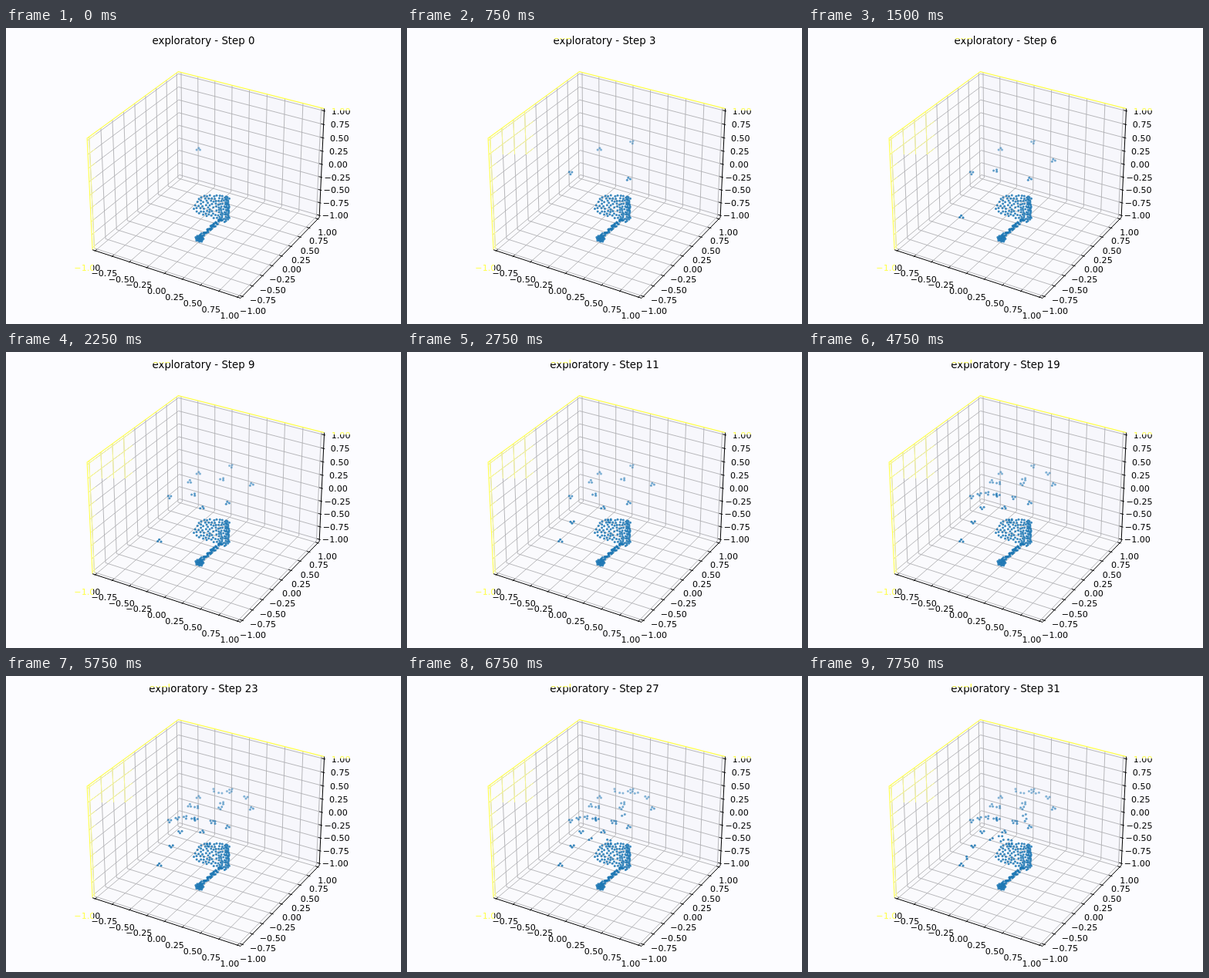
An HTML page with a canvas for the animation above (8000 ms loop, 512 px wide and 384 px high).

```html
<!DOCTYPE html>
<html lang="en">
<head>
<meta charset="utf-8">
<title>exploratory</title>
<style>
  html, body { margin: 0; width: 512px; height: 384px; overflow: hidden; background: #fcfcff; }
  canvas { display: block; }
</style>
</head>
<body>
<canvas id="stage" width="512" height="384"></canvas>
<script>
const STEP_MS = 250, STEPS = 32;
const ctx = document.getElementById('stage').getContext('2d');
const PAPER = '#fcfcff', BLUE = '#1f77b4', YELLOW = '#ffff48', PALE = '#ffff8c', GRID = '#b0b0b4';
const E = 25 / 24, L = E + 0.185;
const TICKS = Array.from({ length: 9 }, (_, i) => i / 4 - 1);

// Perspective view: elevation 30°, azimuth -60°, distance 10.
function project(x, y, z) {
  x *= 4 / 7; y *= 4 / 7; z *= 3 / 7;
  const scale = 1848 / (10 - (0.433 * x - 0.75 * y + 0.5 * z));
  return [
    261.8 + scale * (0.866 * x + 0.5 * y),
    196.5 - scale * (-0.25 * x + 0.433 * y + 0.866 * z)
  ];
}

function trace(points) {
  ctx.beginPath();
  points.forEach(p => ctx.lineTo(...project(...p)));
}

function line(points, color, width = 0.9) {
  trace(points);
  ctx.strokeStyle = color;
  ctx.lineWidth = width;
  ctx.stroke();
}

function pane(points, color) {
  trace(points);
  ctx.fillStyle = color;
  ctx.fill();
}

function inClip(x, y, w, h, draw) {
  ctx.save();
  ctx.beginPath();
  ctx.rect(x, y, w, h);
  ctx.clip();
  draw();
  ctx.restore();
}

function text(str, x, y, size, color = '#000') {
  ctx.font = `${size}px "DejaVu Sans", sans-serif`;
  ctx.textAlign = 'center';
  ctx.fillStyle = color;
  ctx.fillText(str, x, y);
}

// Repaints part of a text in yellow.
function tint(x, y, w, h, draw) {
  inClip(x, y, w, h, () => {
    ctx.fillStyle = PAPER;
    ctx.fillRect(x, y, w, h);
    draw(YELLOW);
  });
}

function drawGrid(color) {
  for (const t of TICKS) {
    line([[t, -E, -E], [t, E, -E], [t, E, E]], color);
    line([[E, t, -E], [-E, t, -E], [-E, t, E]], color);
    line([[-E, -E, t], [-E, E, t], [E, E, t]], color);
  }
}

function label(value, point, dx, dy, color) {
  const [x, y] = project(...point);
  text(value.toFixed(2).replace('-', '\u2212'), x + dx, y + dy + 4, 11.1, color);
}
const xLabel = (t, color) => label(t, [t, -L, -L], 0, 0.5, color);
const yLabel = (t, color) => label(t, [L, t, -L], -4, 0, color);
const zLabel = (t, color) => label(t, [L, L, t], -4.5, 3.5, color);

function drawAxes() {
  const out = E + 0.017, inn = E - 0.034;
  line([[-E, -E, -E], [E, -E, -E], [E, E, -E], [E, E, E]], '#000', 1);
  for (const t of TICKS) {
    line([[t, -out, -E], [t, -inn, -E]], '#000');
    line([[out, t, -E], [inn, t, -E]], '#000');
    line([[out, E, t], [inn, E, t]], '#000');
    xLabel(t);
    yLabel(t);
    zLabel(t);
  }
  tint(86, 304, 27, 12, color => xLabel(-1, color));
  tint(419, 101, 28, 6, color => zLabel(1, color));
}

function drawBox(step) {
  pane([[-E, -E, -E], [-E, E, -E], [-E, E, E], [-E, -E, E]], '#fbfbfd');
  pane([[-E, E, -E], [E, E, -E], [E, E, E], [-E, E, E]], '#f7f7fc');
  pane([[-E, -E, -E], [E, -E, -E], [E, E, -E], [-E, E, -E]], '#fafafd');
  drawGrid(GRID);
  if (step > 0) inClip(100, 50, 64, 114, () => drawGrid(PALE));
  inClip(100, 130, 16, 160, () => drawGrid(PALE));
  line([[-E, -E, -E], [-E, -E, E], [-E, E, E], [E, E, E]], YELLOW, 1.1);
  drawAxes();
}

let seed = 17;
function random() {
  seed = (seed * 16807) % 2147483647;
  return seed / 2147483647;
}
const jitter = r => (random() * 2 - 1) * r;

const bodyTop = x => 217 + 14 * ((x - 270) / 27) ** 4;
const bodyBottom = x => Math.min(238 + 0.36 * (x - 244), 252 - 0.8 * (x - 283));

function makeBody() {
  const dots = [];
  for (let i = 0; i < 6000; i++) {
    const x = 243 + random() * 46.5, y = 216 + random() * 37;
    if (y < bodyTop(x) || y > bodyBottom(x)) continue;
    const gap = x > 284 ? 1.8 : x > 275 ? 2.4 : 3.2;
    if (dots.every(d => Math.hypot(d[0] - x, d[1] - y) > gap)) dots.push([x, y]);
  }
  for (let t = 0; t < 1; t += 0.02) {
    dots.push([278 - 26 * t + jitter(2.2), 248 + 23 * t + jitter(2)]);
  }
  for (let i = 0; i < 26; i++) {
    const a = i * 2.4, r = 5.5 * Math.sqrt(i / 26);
    dots.push([251 + r * Math.cos(a), 273 + 0.85 * r * Math.sin(a)]);
  }
  return dots;
}

// Small clusters sit along short paths; each one appears at its own step.
const clusters = [];
function addCluster(step, x, y) {
  const turn = random() * Math.PI * 2;
  for (let k = 0; k < (step < 20 ? 3 : 2); k++) {
    const a = turn + k * 2.3;
    clusters.push({ step, at: [x + 2.4 * Math.cos(a), y + 1.7 * Math.sin(a)] });
  }
}

function along(steps, x0, y0, x1, y1, bend = 0, power = 1) {
  steps.forEach((step, i) => {
    const t = (i / (steps.length - 1)) ** power;
    addCluster(step, x0 + (x1 - x0) * t, y0 + (y1 - y0) * t - bend * 4 * t * (1 - t));
  });
}

[4, 12, 1, 20, 0].forEach((step, i) => {
  const a = i * Math.PI / 5;
  addCluster(step, 280 + 38 * Math.cos(a), 172 - 25 * Math.sin(a));
});
along([6, 30, 10, 13], 199, 245, 226, 202, 0, 1.4);
along([2, 15, 16, 5], 212, 188, 243, 185, 3);
along([19, 17, 3], 246, 186, 287, 196, 2);
along([7, 18], 238, 168, 247, 170);
along([14, 9], 278, 171, 280, 165);
along([23, 22, 26], 278, 151, 297, 151);
along([21, 28], 270, 190, 283, 187);
along([25, 29, 27], 237, 211, 262, 212, 3);
along([8, 11], 254, 202, 262, 219);
along([24, 31], 281, 181, 251, 213);

const body = makeBody();

function dot([x, y]) {
  ctx.globalAlpha = Math.min(0.88, Math.max(0.45, 0.5 + (y - 150) / 170));
  ctx.beginPath();
  ctx.arc(x, y, 1.5, 0, Math.PI * 2);
  ctx.fill();
}

function drawDots(step) {
  ctx.fillStyle = BLUE;
  clusters.filter(c => c.step <= step).forEach(c => dot(c.at));
  body.forEach(dot);
  ctx.globalAlpha = 1;
}

function drawTitle(step) {
  const write = color => text(`exploratory - Step ${step}`, 256, 21.3, 13.33, color);
  write();
  if (step > 0) tint(180, 8, 32, 6.5, write);
}

let shown = -1;
function render(step) {
  if (step === shown) return;
  shown = step;
  ctx.fillStyle = PAPER;
  ctx.fillRect(0, 0, 512, 384);
  drawBox(step);
  drawDots(step);
  drawTitle(step);
}

const start = performance.now();
function tick() {
  render(Math.floor((performance.now() - start) / STEP_MS) % STEPS);
  requestAnimationFrame(tick);
}
tick();
</script>
</body>
</html>
```
